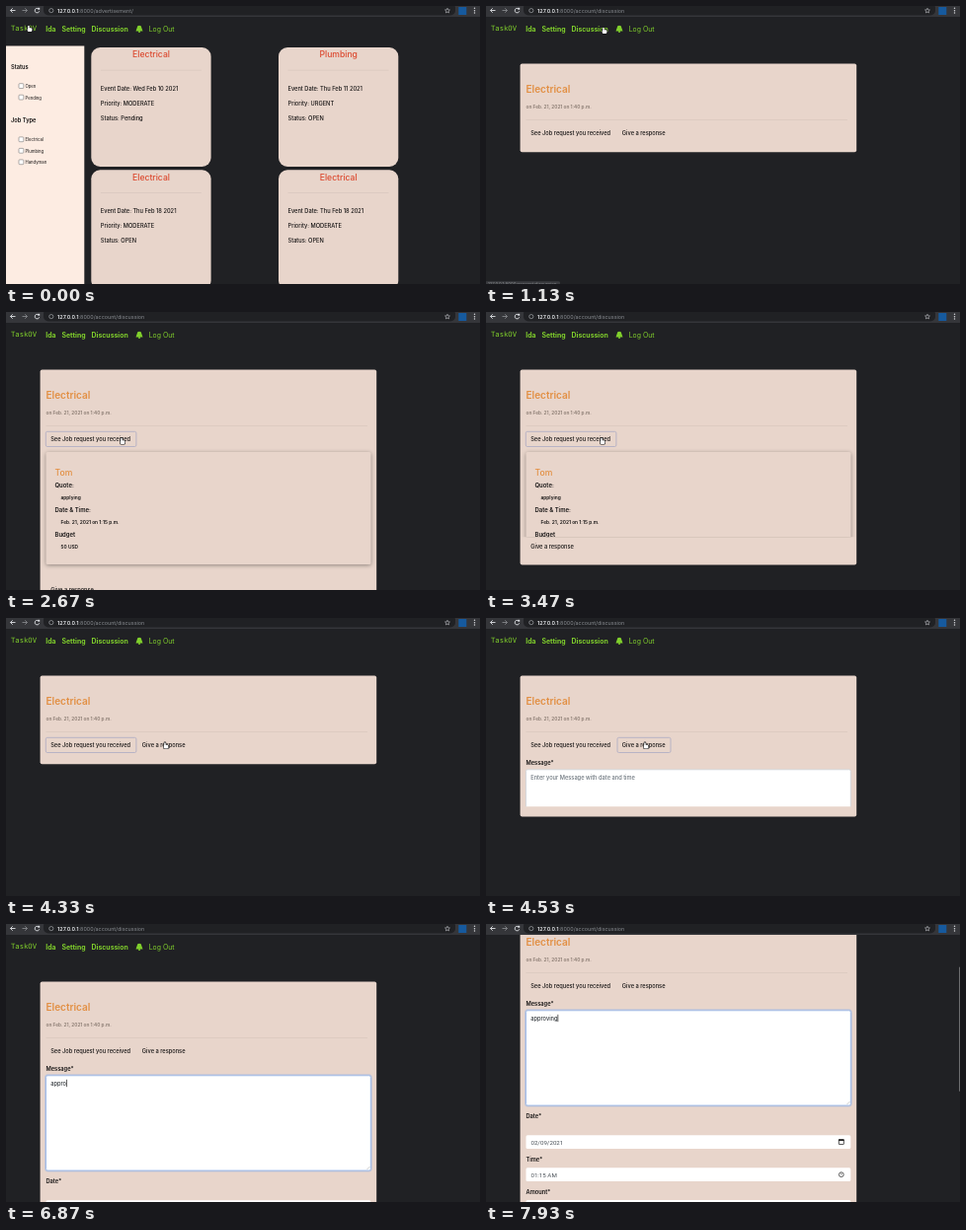
These frames come from a looping animation (480x282 px, 8000 ms). An HTML page with a canvas:

```html
<!DOCTYPE html>
<html lang="en">
<head>
<meta charset="utf-8">
<title>Job board</title>
<style>
html, body { margin: 0; width: 100%; height: 100%; overflow: hidden; background: #202124; }
canvas { display: block; width: 480px; height: 282px; }
</style>
</head>
<body>
<canvas id="stage" width="480" height="282"></canvas>
<script>
const ctx = document.getElementById('stage').getContext('2d');
const W = 480, H = 282, LOOP = 8000, BAR = 11;
const SANS = 'Inter, Roboto, sans-serif', MONO = '"DejaVu Sans Mono", monospace', DIGITS = 'Roboto, Inter, sans-serif';
const BG = '#202124', PANEL = '#e8d5cb', INK = '#151313', GREEN = '#80d02c', ORANGE = '#e28f43';
const LEFT = 40.5, BODY = 5.7;

// event times in ms
const LOAD = 930, SHOW = 1870, HIDE = 3330, REPLY = 4400, FOCUS = 5040, TYPE = 6365, KEY = 125, SCROLL = 7430;
const WORD = 'approving';
const HOME = { x: 24, y: 23 };
const MOVES = [
  { from: 70, to: 730, x: 120, y: 25 },
  { from: 1470, to: 1730, x: 118, y: 131 },
  { from: 3600, to: 3870, x: 162, y: 129.5 },
  { from: 4760, to: FOCUS, x: 136, y: 171 }
];

const clamp = k => Math.max(0, Math.min(1, k));
const smooth = k => k * k * (3 - 2 * k);
const ramp = (t, from, to) => smooth(clamp((t - from) / (to - from)));
const within = (t, from, to) => t >= from && t < to;

function text(s, x, y, size = BODY, color = INK, weight = 500, family = SANS) {
  ctx.font = `${weight} ${size}px ${family}`;
  ctx.fillStyle = color;
  ctx.fillText(s, x, y);
  return x + ctx.measureText(s).width;
}

function box(x, y, w, h, r, fill, stroke, line = 1) {
  ctx.beginPath();
  ctx.roundRect(x, y, w, h, r);
  if (fill) { ctx.fillStyle = fill; ctx.fill(); }
  if (stroke) { ctx.strokeStyle = stroke; ctx.lineWidth = line; ctx.stroke(); }
}

function rect(x, y, w, h, fill) {
  ctx.fillStyle = fill;
  ctx.fillRect(x, y, w, h);
}

function line(color, width, x0, y0, x1, y1) {
  ctx.strokeStyle = color;
  ctx.lineWidth = width;
  ctx.beginPath();
  ctx.moveTo(x0, y0);
  ctx.lineTo(x1, y1);
  ctx.stroke();
}

function ring(x, y, r, color, width, from = 0, to = Math.PI * 2) {
  ctx.beginPath();
  ctx.arc(x, y, r, from, to);
  ctx.strokeStyle = color;
  ctx.lineWidth = width;
  ctx.stroke();
}

function dot(x, y, r, color) {
  ctx.beginPath();
  ctx.arc(x, y, r, 0, Math.PI * 2);
  ctx.fillStyle = color;
  ctx.fill();
}

function clipped(y, h, draw) {
  ctx.save();
  ctx.beginPath();
  ctx.rect(34, y, 342, h);
  ctx.clip();
  draw();
  ctx.restore();
}

function arrow(x, dir, color) {
  const tip = x + dir * 2.5;
  line(color, 0.9, x - dir * 2.5, 4.5, tip, 4.5);
  for (const side of [-1, 1]) line(color, 0.9, tip, 4.5, tip - dir * 2.2, 4.5 + side * 2.2);
}

function star(x, y) {
  ctx.beginPath();
  for (let i = 0; i < 10; i++) {
    const a = i * Math.PI / 5 - Math.PI / 2, r = i % 2 ? 1.2 : 2.6;
    ctx.lineTo(x + r * Math.cos(a), y + r * Math.sin(a));
  }
  ctx.closePath();
  ctx.strokeStyle = '#c4c7cb';
  ctx.lineWidth = 0.6;
  ctx.stroke();
}

function toolbar(path) {
  rect(0, 0, W, BAR, '#35363a');
  box(38, -3, 417, 12.5, 5, BG);
  arrow(7, -1, '#dfe1e5');
  arrow(19, 1, '#85878b');
  ring(31.5, 4.6, 2.3, '#dfe1e5', 0.9, 0.3, 5.4);
  rect(32.3, 1.8, 1.9, 1.9, '#dfe1e5');
  ring(45.8, 4.6, 2.1, '#a2a5a9', 0.7);
  const end = text('127.0.0.1', 52, 6.7, 5.4, '#e8eaed', 600);
  text(':8000/' + path, end, 6.7, 5.4, '#878b90', 400);
  star(447, 4.8);
  rect(458.3, 1, 8, 8, '#165a9e');
  for (let i = 0; i < 3; i++) dot(474.5, 2.3 + i * 2.4, 0.75, '#d5d7da');
}

function bell(x, y) {
  ctx.beginPath();
  ctx.arc(x, y - 1.2, 2.3, Math.PI, 0);
  ctx.lineTo(x + 3.5, y + 2.2);
  ctx.lineTo(x - 3.5, y + 2.2);
  ctx.fillStyle = GREEN;
  ctx.fill();
  dot(x, y + 2.9, 1, GREEN);
}

function nav() {
  const base = 25.6, size = 6.9;
  text('TaskOV', 5, base - 0.3, 7.2, GREEN, 400, MONO);
  let x = 40.2;
  for (const label of ['Ida', 'Setting', 'Discussion']) x = text(label, x, base, size, GREEN, 700) + 6;
  bell(135, 23.2);
  text('Log Out', 144.7, base, size, GREEN, 400);
}

function checks(title, y, labels) {
  text(title, 5, y, BODY, INK, 600);
  labels.forEach((label, i) => {
    const cy = y + 17 + i * 11.5;
    box(13, cy - 2.5, 4.8, 4.8, 0.8, '#fff', '#777', 0.6);
    text(label, 19.5, cy + 2, 4.25, INK, 400);
  });
}

function jobCard(i, title, date, priority, status) {
  const x = 86.3 + (i % 2) * 189.7, y = 42 + Math.floor(i / 2) * 124.3;
  box(x, y, 121.3, 121, 9, PANEL);
  ctx.textAlign = 'center';
  text(title, x + 60.7, y + 10.2, 8.6, '#dc4a30');
  ctx.textAlign = 'left';
  rect(x + 9.5, y + 22.8, 102, 0.6, 'rgba(0,0,0,.09)');
  ['Event Date: ' + date, 'Priority: ' + priority, 'Status: ' + status]
    .forEach((s, row) => text(s, x + 9.5, y + 43.6 + row * 15.2));
}

function board() {
  rect(0, 40.5, 79.3, H, '#fdece2');
  checks('Status', 64.2, ['Open', 'Pending']);
  checks('Job Type', 118.4, ['Electrical', 'Plumbing', 'Handyman']);
  jobCard(0, 'Electrical', 'Wed Feb 10 2021', 'MODERATE', 'Pending');
  jobCard(1, 'Plumbing', 'Thu Feb 11 2021', 'URGENT', 'OPEN');
  for (const i of [2, 3]) jobCard(i, 'Electrical', 'Thu Feb 18 2021', 'MODERATE', 'OPEN');
}

function requestInfo() {
  ctx.save();
  ctx.shadowColor = 'rgba(0,0,0,.38)';
  ctx.shadowBlur = 4;
  ctx.shadowOffsetY = 1;
  box(LEFT, 142, 329, 114, 1.5, PANEL);
  ctx.restore();
  text('Tom', 49.5, 166, 8.6, ORANGE);
  [['Quote:', 'applying'], ['Date & Time:', 'Feb. 21, 2021 on 1:15 p.m.'], ['Budget', '50 USD']]
    .forEach(([label, value], i) => {
      const y = 178.2 + i * 24.9;
      text(label, 49.5, y, 5.95, INK, 600);
      text(value, 55.5, y + 11.9, 4.85, INK, 600);
    });
}

function field(label, y, gap, value) {
  text(label, LEFT, y, BODY, INK, 600);
  box(LEFT, y + gap, 328.8, 13.8, 1.5, '#fff');
  text(value, 45.4, y + gap + 9.3, 6.2, '#495057', 400, DIGITS);
}

function messageBox(t) {
  const focus = t >= FOCUS;
  const typed = WORD.slice(0, Math.max(0, Math.floor((t - TYPE) / KEY) + 1));
  text('Message*', LEFT, 149, BODY, INK, 600);
  if (focus) box(LEFT, 153.8, 328.8, 96.2, 2, null, 'rgba(150,180,230,.45)', 3);
  box(LEFT, 153.8, 328.8, 96.2, 1.5, '#fff', focus ? '#93b4e8' : '#cfd4da', 0.8);
  line('#999', 0.5, 365.5, 249, 368.3, 246.2);
  const end = text(typed, 45.2, 163.5, BODY, '#33383d');
  if (!typed) text('Enter your Message with date and time', 45.2, 163.5, BODY, '#6c757d');
  if (focus && !within(t, 5400, 5870)) rect(end, 157.8, 0.7, 7.4, '#222');
}

function form(t) {
  messageBox(t);
  field('Date*', 263, 17.3, '02/09/2021');
  box(357.3, 284.8, 5, 4.8, 0.5, null, '#222', 0.8);
  rect(357, 284.3, 5.6, 1.7, '#222');
  field('Time*', 307.4, 5.9, '01:15 AM');
  ring(359.8, 320.2, 2.4, '#222', 0.7);
  line('#222', 0.6, 359.8, 318.6, 359.8, 320.6);
  field('Amount*', 340, 5.9, '');
}

function discussion(t) {
  const open = SHOW + 100, shut = HIDE + 370;
  const infoOpen = within(t, open, shut);
  const info = 135 * (ramp(t, open, open + 500) - ramp(t, HIDE, shut));
  const reply = 270 * ramp(t, REPLY, REPLY + 460);
  const height = 89.7 + reply + (infoOpen ? 17 + info : 0);
  const outline = (x, w) => box(x, 121.3, w, 15.2, 1.5, null, '#b3afc4', 0.9);

  box(34.6, 58.6, 340.6, height, 2, PANEL);
  text('Electrical', LEFT, 88.1, 10, ORANGE, 600);
  text('on Feb. 21, 2021 on 1:40 p.m.', LEFT, 103.9, 4.75, '#87786f', 600);
  rect(LEFT, 115, 325.5, 0.6, 'rgba(0,0,0,.08)');
  if (within(t, SHOW, REPLY)) outline(40.3, 91.6);
  if (within(t, REPLY, FOCUS)) outline(133, 54);
  text('See Job request you received', 45.2, 131);
  text('Give a response', infoOpen ? 45.2 : 137.8, infoOpen ? 148.5 + info : 131);
  if (infoOpen) clipped(137, info, requestInfo);
  if (reply) clipped(138, reply, () => form(t));
}

function hand() {
  const parts = (fill, stroke) => {
    box(-1.8, -3.3, 1.5, 5, 0.7, fill, stroke, 1.2);
    box(-2.3, -0.7, 4.7, 3.7, 1.3, fill, stroke, 1.2);
  };
  parts(null, '#111');
  parts('#fff');
}

function beam() {
  line('#222', 0.8, 0, -2.8, 0, 2.8);
  for (const y of [-2.8, 2.8]) line('#222', 0.8, -1.4, y, 1.4, y);
}

function arrowhead() {
  ctx.beginPath();
  ctx.moveTo(-2, -3.5);
  ctx.lineTo(-2, 2.7);
  ctx.lineTo(2.3, 1.1);
  ctx.closePath();
  ctx.strokeStyle = '#111';
  ctx.lineWidth = 1.2;
  ctx.stroke();
  ctx.fillStyle = '#fff';
  ctx.fill();
}

function pointer(t) {
  let { x, y } = HOME;
  for (const move of MOVES) {
    const k = ramp(t, move.from, move.to);
    x += (move.x - x) * k;
    y += (move.y - y) * k;
  }
  const onNav = y < 29, onButton = within(y, 121, 137), onField = t > REPLY && y > 153;
  ctx.save();
  ctx.translate(x, y);
  if (onNav || onButton) hand();
  else if (onField) beam();
  else arrowhead();
  ctx.restore();
}

function draw(t) {
  const loaded = t >= LOAD;
  const scroll = 66 * ramp(t, SCROLL, SCROLL + 470);
  rect(0, 0, W, H, BG);
  ctx.save();
  ctx.translate(0, -scroll);
  nav();
  if (loaded) discussion(t); else board();
  ctx.restore();
  toolbar(loaded ? 'account/discussion' : 'advertisement/');
  if (within(t, 700, 1330)) {
    box(-2, 279.3, 77, 6, 1.5, '#3a3b3f');
    text('127.0.0.1:8000/account/discussion', 2, 284, 4.3, '#85878b', 400);
  }
  if (scroll) rect(479, 12 + scroll * 0.48, 1, 126, 'rgba(255,255,255,.35)');
  if (t < TYPE) pointer(t);
}

const start = performance.now();
function tick() {
  draw((performance.now() - start) % LOOP);
  requestAnimationFrame(tick);
}
tick();
</script>
</body>
</html>
```
